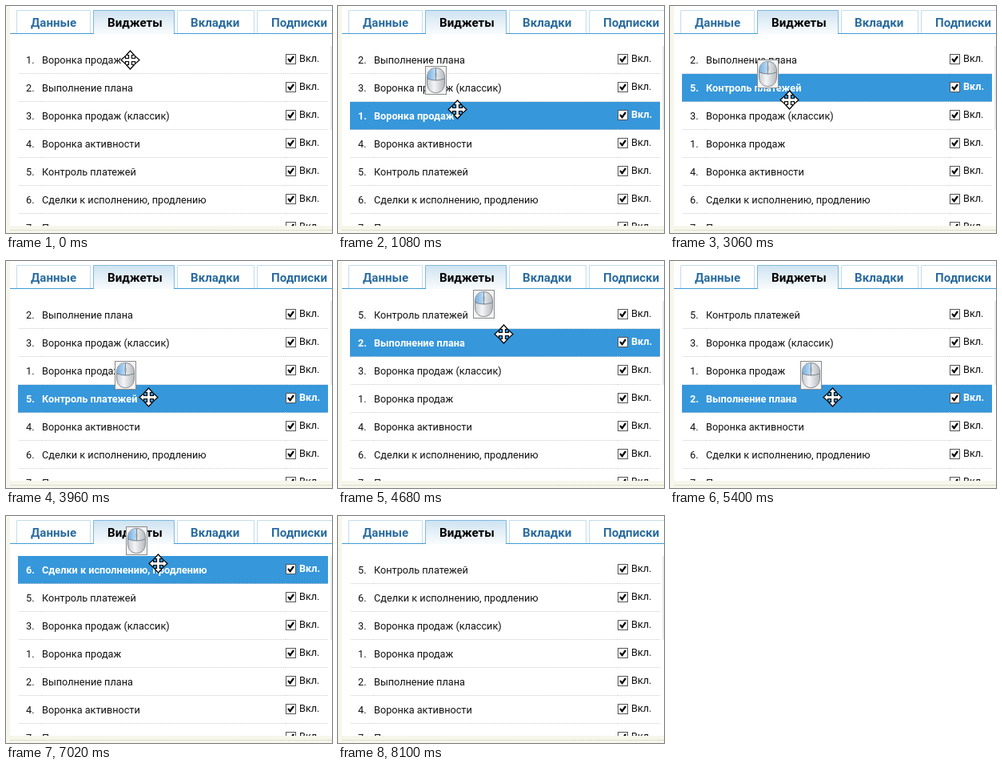
An HTML page that plays this animation: 408 by 284 pixels, repeating every 9180 ms.

```html
<!DOCTYPE html>
<html lang="ru">
<head>
<meta charset="utf-8">
<title>Виджеты</title>
<style>
  html, body { margin: 0; width: 100%; height: 100%; overflow: hidden; background: #f6f6eb; }
  svg { display: block; width: 408px; height: 284px; }
  text { font: 12.7px Roboto, "Open Sans", sans-serif; fill: #111; }
  .tab { font-size: 15.1px; font-weight: 700; fill: #2a6c9f; }
  .tab.on { fill: #000; }
  .bar { fill: #3697db; visibility: hidden; }
  .held .bar { visibility: visible; }
  .held text { fill: #fff; font-weight: 700; }
  .dots { fill: none; stroke: #ccc; stroke-dasharray: 1 1; }
</style>
</head>
<body>
<svg viewBox="0 0 408 284">
  <defs>
    <linearGradient id="tabFill" x2="0" y2="1">
      <stop stop-color="#cee3f1"/><stop offset="1" stop-color="#f8fbfd"/>
    </linearGradient>
    <linearGradient id="shell">
      <stop stop-color="#c6ccd2"/><stop offset=".4" stop-color="#f4f5f6"/><stop offset="1" stop-color="#b4b9be"/>
    </linearGradient>
    <linearGradient id="button">
      <stop stop-color="#78aee0"/><stop offset="1" stop-color="#bcdcf6"/>
    </linearGradient>
    <clipPath id="panel"><rect x="5" width="403" height="275"/></clipPath>
  </defs>
  <rect width="408" height="284" fill="#f6f6eb"/>
  <rect x="5" width="403" height="275" fill="#fff"/>
  <path d="M5 280.5H408" class="dots" style="stroke:#c4c4b4"/>
  <rect x="406" y="50" width="2" height="105" fill="#ebebeb"/>
  <g id="tabs"></g>
  <g id="list" clip-path="url(#panel)"></g>
  <g id="mouse">
    <rect x=".5" y=".5" width="26" height="35" fill="#f4f4f4" stroke="#8a8a8a"/>
    <path d="M13.5 2.5C20 2.5 24.5 7 24.5 14V21C24.5 29 20 33.5 13.5 33.5S2.5 29 2.5 21V14C2.5 7 7 2.5 13.5 2.5Z" fill="url(#shell)" stroke="#82898f"/>
    <path d="M13 3C7 3 3 7 3 14V16Q8 18 13 18Z" fill="url(#button)"/>
    <path d="M3 16Q13.5 20 24 16M13.5 3V18" fill="none" stroke="#76828c"/>
    <rect x="12.5" y="8" width="2" height="6" rx="1" fill="#8d98a2"/>
  </g>
  <path id="cursor" fill="#fff" stroke="#000" stroke-width="1.2"
    d="M0-11.5L5-6H2V-2H6V-5L11.5 0L6 5V2H2V6H5L0 11.5L-5 6H-2V2H-6V5L-11.5 0L-6-5V-2H-2V-6H-5Z"/>
</svg>
<script>
const STEP = 180, LOOP = 9180, ROW = 35, LAST = 45;
const $ = id => document.getElementById(id);

const names = ['Воронка продаж', 'Выполнение плана', 'Воронка продаж (классик)',
  'Воронка активности', 'Контроль платежей', 'Сделки к исполнению, продлению', 'Последние сделки'];

// label, left edge, right edge, text start
const tabs = [['Данные', 13, 106, 31], ['Виджеты', 109, 211, 127],
  ['Вкладки', 214, 311, 231], ['Подписки', 314, 412, 332]];

// step, x, y
const path = [[0, 155, 67], [1, 155, 64], [3, 153, 226], [5, 148, 100], [6, 149, 129],
  [8, 150, 226], [10, 150, 59], [11, 148, 133], [12, 145, 213], [14, 141, 178],
  [16, 149, 118], [17, 149, 117], [18, 150, 62], [21, 165, 226], [24, 205, 59],
  [25, 219, 59], [26, 207, 91], [29, 205, 226], [32, 200, 59], [34, 195, 178], [35, 186, 205],
  [36, 184, 152], [39, 190, 59], [41, 200, 108], [42, 206, 138], [44, 174, 242]];

const drags = [
  { item: 1, from: 1, to: 11, grab: 0 },
  { item: 5, from: 12, to: 24, grab: 0 },
  { item: 2, from: 26, to: 34, grab: 0 },
  { item: 6, from: 35, to: 41, grab: -10 }
];

const clamp = (v, lo, hi) => Math.min(hi, Math.max(lo, v));
const place = (el, x, y) => el.setAttribute('transform', `translate(${x} ${y})`);

$('tabs').innerHTML = '<path d="M5 34.5H408" stroke="#3f9bd6"/>' + tabs.map(([label, l, r, x], i) => {
  const on = i === 1;
  return `<path d="M${l + .5} 34V5.5H${r - .5}V34" fill="${on ? 'url(#tabFill)' : '#fff'}" stroke="${on ? '#7fb9df' : '#c3dcec'}"/>` +
    (on ? `<path d="M${l + 1} 34.5H${r - 1}" stroke="#f8fbfd"/>` : '') +
    `<text class="tab${on ? ' on' : ''}" x="${x}" y="26">${label}</text>`;
}).join('');

// each cell of a row has its own dotted underline
$('list').innerHTML = names.map((name, i) => `<g class="row" transform="translate(0 ${50 + i * ROW})">
  <rect class="bar" x="15" width="388" height="35"/>
  <text x="25" y="22">${i + 1}.</text><text x="45" y="22">${name}</text>
  <rect x="350.5" y="10.5" width="12" height="12" fill="#fff" stroke="#555"/>
  <path d="M353 16l2.6 3.2L360 13" fill="none" stroke="#000" stroke-width="2.2"/>
  <text x="367" y="20">Вкл.</text>
  <path class="dots" d="M16 34.5H45M45 34.5H350M350 34.5H403"/></g>`).join('');
const rows = [...document.querySelectorAll('.row')];

function cursorAt(step) {
  const s = clamp(step, 0, 44);
  const i = Math.max(1, path.findIndex(p => p[0] >= s));
  const [a, b] = [path[i - 1], path[i]];
  const k = (s - a[0]) / (b[0] - a[0]);
  return { x: Math.round(a[1] + (b[1] - a[1]) * k), y: Math.round(a[2] + (b[2] - a[2]) * k) };
}

function orderAt(step) {
  const order = [1, 2, 3, 4, 5, 6];
  for (const d of drags) {
    if (step < d.from) break;
    const { y } = cursorAt(Math.min(step, d.to));
    const slot = clamp(Math.round((y - 67 - d.grab) / ROW), 0, 4);
    order.splice(order.indexOf(d.item), 1);
    order.splice(slot, 0, d.item);
  }
  return order;
}

// the button hint trails the pointer slightly
const lag = (now, before) => Math.round(clamp((now - before) / 7, -5, 5));

function draw(step) {
  const held = drags.find(d => step >= d.from && step <= d.to);
  orderAt(step).forEach((item, slot) => {
    const row = rows[item - 1];
    place(row, 0, 50 + slot * ROW);
    row.classList.toggle('held', !!held && held.item === item);
  });
  const c = cursorAt(step), prev = cursorAt(step - 1);
  place($('cursor'), c.x + .5, c.y + .5);
  place($('mouse'), c.x - 40 - lag(c.x, prev.x), c.y - 50 - lag(c.y, prev.y));
  $('cursor').style.display = step < LAST ? '' : 'none';
  $('mouse').style.display = held ? '' : 'none';
}

const start = performance.now();
let shown = -1;
function tick() {
  const t = (performance.now() - start) % LOOP;
  const step = Math.min(LAST, Math.floor(t / STEP));
  if (step !== shown) draw(shown = step);
  requestAnimationFrame(tick);
}
tick();
</script>
</body>
</html>
```
